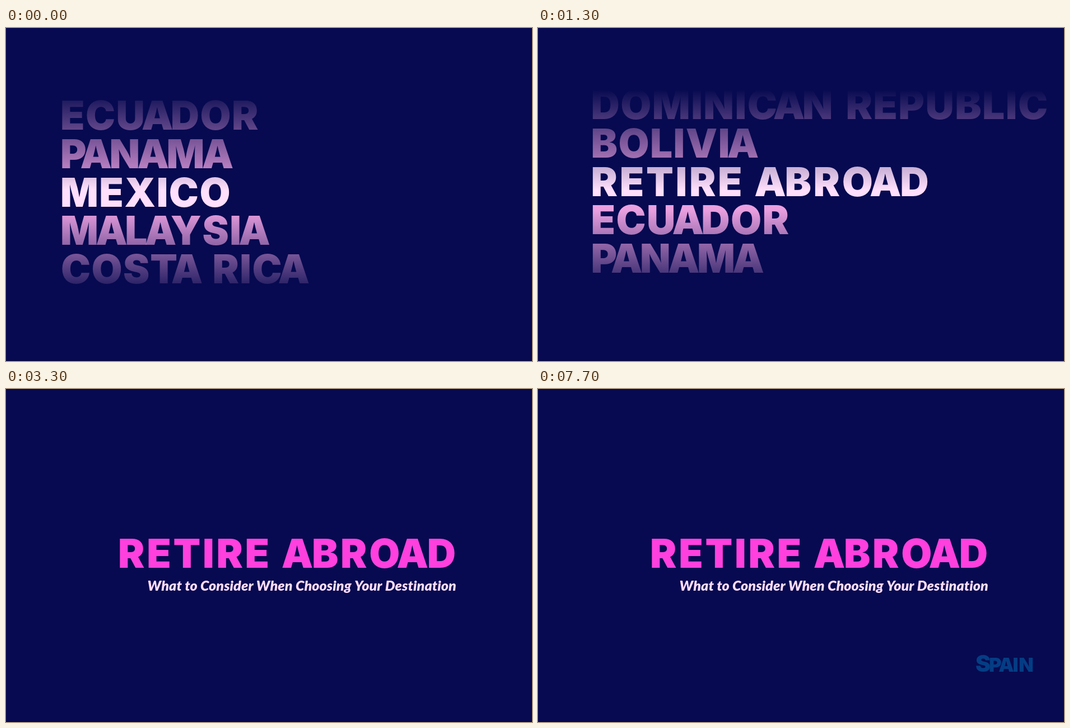
An HTML page with a canvas that plays this animation: 939 px wide and 596 px high, repeating every 8000 ms.

```html
<!DOCTYPE html>
<html lang="en">
<head>
<meta charset="utf-8">
<title>Retire Abroad</title>
<style>
  html, body { margin: 0; width: 100%; height: 100%; overflow: hidden; background: #070a50; }
  canvas { display: block; width: 939px; height: 596px; }
</style>
</head>
<body>
<canvas id="stage" width="939" height="596"></canvas>
<script>
const W = 939, H = 596, LOOP = 8000;
const ctx = document.getElementById('stage').getContext('2d');

const PINK = '#ff40de', DIM = '#043d84', BRIGHT = '#0056a8';
const TITLE = 'RETIRE ABROAD', SUBTITLE = 'What to Consider When Choosing Your Destination';
const ROW = 68.75, BASE = 319.5, HEAD = 71, TITLE_X = 203;
const LIST_TRACK = 0.021, TITLE_TRACK = 0.053, TIGHT_A = 0.085, WORD_GAP = 0.085;
const COUNTRIES = ['ECUADOR', 'PANAMA', 'MEXICO', 'MALAYSIA', 'COSTA RICA', 'SPAIN', 'MALTA',
  'COLOMBIA', 'PORTUGAL', 'THAILAND', 'BELIZE', 'DOMINICAN REPUBLIC', 'BOLIVIA', TITLE];

// Drift of the scrolling list, as [time, pixels].
const DRIFT_X = [[0, 100], [400, 102], [800, 102.5], [1300, 97.5], [1540, 98.5]];
const DRIFT_Y = [[0, 0], [250, 5], [400, 3], [800, 0], [1100, 0], [1300, -19], [1540, 0]];

// A word stays dim for its first `dim` ms.
const WORDS = [
  { name: 'Mexico', x: 576, y: 112, from: 4200, to: 4700 },
  { name: 'Malaysia', x: 122, y: 144, from: 4700, to: 5800 },
  { name: 'Bolivia', x: 510, y: 464, from: 5100, to: 6130, dim: 700 },
  { name: 'Costa Rica', x: 376, y: 236, from: 6230, to: 7400 },
  { name: 'Panama', x: 93, y: 456, from: 7400, to: 7700 },
  { name: 'Spain', x: 782, y: 505.5, from: 7700, to: LOOP, dim: 300 }
];

const clamp = (v, lo = 0, hi = 1) => Math.min(hi, Math.max(lo, v));
const stepsSince = (t, from, size) => Math.floor((t - from) / size);

function along(points, t) {
  const i = points.findIndex(p => p[0] > t);
  if (i < 0) return points[points.length - 1][1];
  const [t0, a] = points[i - 1], [t1, b] = points[i];
  return a + (b - a) * (t - t0) / (t1 - t0);
}

function drift(t) {
  const held = t < 1400 ? 100 * stepsSince(t, 0, 100) : 1400 + 70 * stepsSince(t, 1400, 70);
  return [along(DRIFT_X, held), along(DRIFT_Y, held)];
}

// Leaves the list in three steps, reaching 1 at 2520 ms.
const exitAt = t => clamp(stepsSince(t, 2310, 70) / 3);

function fade(rgb) {
  const g = ctx.createLinearGradient(0, 110, 0, 485);
  for (const [y, a] of [[110, 0], [290, 1], [325, 1], [485, 0]])
    g.addColorStop((y - 110) / 375, `rgba(${rgb},${a})`);
  return g;
}
const paleFade = fade([255, 223, 251]), mauveFade = fade([234, 160, 224]);

const width = s => ctx.measureText(s).width;

// Draws loosely tracked capitals with a tight A; colour may depend on the letter's index.
function drawCaps(text, x, y, size, track, colour) {
  ctx.font = `900 ${size}px Inter, "Open Sans", sans-serif`;
  x += ctx.measureText(text[0]).actualBoundingBoxLeft;
  [...text].forEach((c, i) => {
    const next = text[i + 1] || '';
    ctx.fillStyle = typeof colour === 'function' ? colour(i) : colour;
    ctx.fillText(c, x, y);
    const tight = TIGHT_A * ((c === 'A') + (next === 'A'));
    const gap = c === ' ' ? WORD_GAP : 0;
    x += width(c + next) - width(next) + size * (track + gap - tight);
  });
  return x;
}

function drawList(t) {
  const row = Math.min(COUNTRIES.length - 1, 2 + stepsSince(t, 0, 100));
  const [x, dy] = drift(t);
  for (let k = -2; k <= 2; k++) {
    const text = COUNTRIES[(row + k) % COUNTRIES.length];
    if (text === TITLE && k === 0) continue;
    ctx.globalAlpha = 1 - exitAt(t);
    drawCaps(text, x, BASE + dy + k * ROW, HEAD, LIST_TRACK, k ? mauveFade : paleFade);
  }
  ctx.globalAlpha = 1;
}

function drawTitle(t) {
  const [left, dy] = drift(t);
  const x = left + (TITLE_X - left) * exitAt(t);
  const k = stepsSince(t, 1540, 70);
  const lit = k + Math.max(0, k - 6);
  drawCaps(TITLE, x, BASE + dy, HEAD, TITLE_TRACK, i => i < lit ? PINK : paleFade);
}

// Rises in four steps, swinging past its place before it settles.
function drawSubtitle(t) {
  const p = clamp(stepsSince(t, 3090, 70) / 3);
  const dy = 125 * Math.cos(1.5 * Math.PI * p) * (1 - 0.63 * p);
  ctx.font = 'italic 900 25px Lato, "Open Sans", sans-serif';
  ctx.letterSpacing = '0.1px';
  ctx.textAlign = 'right';
  ctx.globalAlpha = 0.4 + 0.6 * p;
  ctx.fillStyle = '#fddcf9';
  ctx.fillText(SUBTITLE, 804, 361 + dy);
  ctx.globalAlpha = 1;
  ctx.textAlign = 'left';
  ctx.letterSpacing = '0px';
}

// Large initials followed by smaller capitals.
function drawWord({ name, x, y, from, dim = 0 }, t) {
  const colour = t < from + dim ? DIM : BRIGHT;
  for (const part of name.split(/(?=[A-Z])/)) {
    x = drawCaps(part[0], x, y, 40.5, 0, colour);
    x = drawCaps(part.slice(1).toUpperCase(), x - 2, y, 34.5, LIST_TRACK, colour);
  }
}

function draw(t) {
  ctx.fillStyle = '#070a50';
  ctx.fillRect(0, 0, W, H);
  ctx.fillStyle = '#040636';
  ctx.fillRect(0, H - 1, W, 1);
  if (t < 2520) drawList(t);
  if (t >= 1100) drawTitle(t);
  if (t >= 3090) drawSubtitle(t);
  for (const word of WORDS)
    if (t >= word.from && t < word.to) drawWord(word, t);
}

const start = performance.now();
function tick() {
  draw((performance.now() - start) % LOOP);
  requestAnimationFrame(tick);
}
tick();
</script>
</body>
</html>
```
